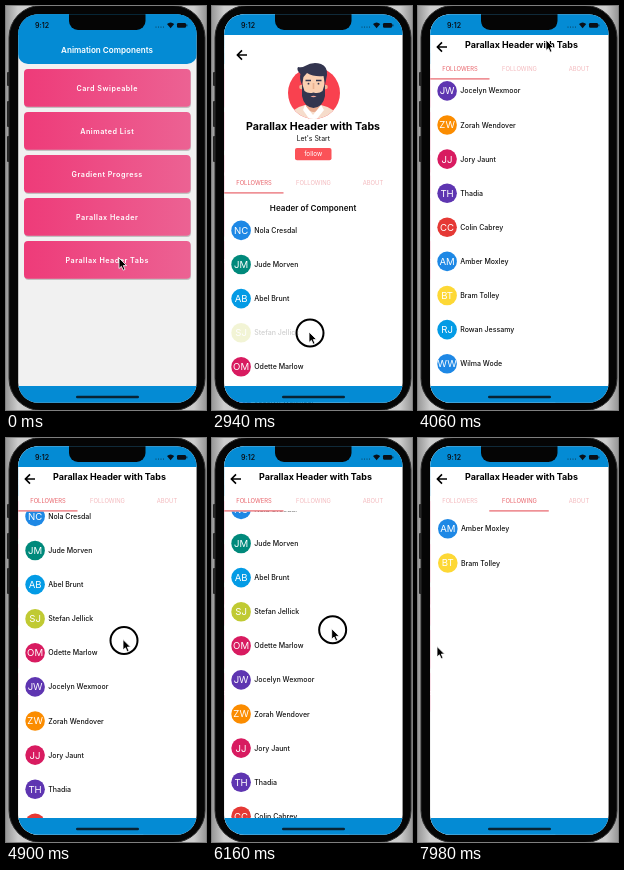
An HTML page that plays this animation: 200x404 px, repeating every 8 s.

```html
<!DOCTYPE html>
<html lang="en">
<head>
<meta charset="utf-8">
<title>Parallax header demo</title>
<style>
html, body { margin: 0; width: 100%; height: 100%; overflow: hidden; background: #c6c6c6; }
svg { display: block; width: 100vw; height: 100vh; }
text { font-family: Inter, Roboto, "Liberation Sans", sans-serif; }
</style>
</head>
<body>
<svg id="stage" viewBox="0 0 200 404"></svg>
<script>
const BLUE = '#048bd4', RED = '#e8636a', PALE = '#f3b9bd';
const PAGE = 179, PITCH = 34.1;

const label = (x, y, size, weight, fill, text, anchor = 'middle', extra = '') =>
  `<text x="${x}" y="${y + size * .36}" font-size="${size}" font-weight="${weight}" fill="${fill}" text-anchor="${anchor}" ${extra}>${text}</text>`;
const box = (x, y, w, h, fill, r = 0, extra = '') =>
  `<rect x="${x}" y="${y}" width="${w}" height="${h}" rx="${r}" fill="${fill}" ${extra}/>`;

const people = [
  ['NC', 'Nola Cresdal', '#1e88e5'], ['JM', 'Jude Morven', '#00897b'],
  ['AB', 'Abel Brunt', '#039be5'], ['SJ', 'Stefan Jellick', '#c0ca33'],
  ['OM', 'Odette Marlow', '#d81b60'], ['JW', 'Jocelyn Wexmoor', '#5e35b1'],
  ['ZW', 'Zorah Wendover', '#fb8c00'], ['JJ', 'Jory Jaunt', '#d81b60'],
  ['TH', 'Thadia', '#5e35b1'], ['CC', 'Colin Cabrey', '#e53935'],
  ['AM', 'Amber Moxley', '#1e88e5'], ['BT', 'Bram Tolley', '#fdd835'],
  ['RJ', 'Rowan Jessamy', '#039be5'], ['WW', 'Wilma Wode', '#1e88e5']
];
const row = ([initials, name, color], y, id = '') =>
  `<g ${id && `id="${id}"`}><circle cx="29.1" cy="${y}" r="9.8" fill="${color}"/>` +
  label(29.1, y, 9.6, 400, '#fff', initials) +
  label(42.2, y, 7, 500, '#111', name, 'start') + '</g>';

const menu = ['Card Swipeable', 'Animated List', 'Gradient Progress', 'Parallax Header', 'Parallax Header Tabs']
  .map((name, i) => {
    const y = 63 + 43 * i;
    return `<g id="menu${i}">` + box(18.5, y + 1, 166.5, 38, '#0003', 4) + box(18, y, 166.5, 37.7, 'url(#pink)', 4) +
      label(101.2, y + 19.3, 7.2, 600, '#fff', name, 'middle', 'letter-spacing=".5"') + '</g>';
  }).join('');

const portrait = `
  <circle cx="102" cy="87" r="26" fill="#f9414f"/>
  <g clip-path="url(#disc)">
    <path d="M76 114Q79 102 93 99H109Q124 102 127 114Z" fill="#f6dccb"/>
    <path d="M94 92H109V102Q102 110 94 102Z" fill="#e8a98c"/>
    <path d="M93 99L101 109L109 99L112 104L104 114H98L91 104Z" fill="#fff"/>
  </g>
  <circle cx="89.500" cy="81" r="2.300" fill="#f2b798"/><circle cx="113.500" cy="81" r="2.300" fill="#f2b798"/>
  <path d="M90.500 66H112.500V88Q111 97 101.500 97Q92 97 90.500 88Z" fill="#fbcfb1"/>
  <path d="M90 77L92.500 85Q96 88 101.500 86.500Q107 88 110.500 85L113 77V90Q111 101 101.500 102Q92 101 90 90Z" fill="#33354f"/>
  <path d="M98.500 90.300Q101.500 89.300 104.500 90.300Q101.500 92 98.500 90.300Z" fill="#f2a79a"/>
  <path d="M90 79Q87 72 88.500 68Q84 64 86 61Q90 62 93 60Q101 55 109 58Q116 61 115 69L113 79L111.500 70Q102 71 95 67L91.500 71Z" fill="#33354f"/>
  <path d="M93.500 74.500H99M104 74.500H109.500" stroke="#33354f" stroke-width="1.3"/>
  <circle cx="96.500" cy="77.700" r=".9" fill="#33354f"/><circle cx="106.500" cy="77.700" r=".9" fill="#33354f"/>
  <path d="M101.500 77V83" stroke="#eab08f" stroke-width="1.600"/>`;

const tabs = ['FOLLOWERS', 'FOLLOWING', 'ABOUT'];

document.getElementById('stage').innerHTML = `
<defs>
  <linearGradient id="pink"><stop stop-color="#ee3b79"/><stop offset="1" stop-color="#ec6293"/></linearGradient>
  <linearGradient id="edge"><stop stop-color="#989898"/><stop offset=".06" stop-color="#cdcdcd"/>
    <stop offset=".94" stop-color="#cdcdcd"/><stop offset="1" stop-color="#989898"/></linearGradient>
  <clipPath id="screen">${box(12.2, 8.2, 178.4, 388.6, '#000', 20)}</clipPath>
  <clipPath id="disc"><circle cx="102" cy="87" r="26"/></clipPath>
  <clipPath id="listClip"><rect id="listBox" x="12" width="179" height="400"/></clipPath>
</defs>
${box(0, 0, 200, 404, 'url(#edge)')}
${box(1, 66, 4, 14, '#222', 1)}${box(1, 95, 4, 26, '#222', 1)}${box(1, 130, 4, 26, '#222', 1)}
${box(3, -.5, 196, 405, '#050505', 32, 'stroke="#2c2c2c" stroke-width="1"')}
<g clip-path="url(#screen)">
  <g id="menu">
    ${box(12, 8, 179, 389, '#f1f1f1')}
    ${box(12, 0, 179, 58, BLUE, 10)}
    ${label(101, 44, 8.1, 600, '#fff', 'Animation Components')}
    ${menu}
  </g>
  <g id="profile">
    ${box(12, 8, 179, 389, '#fff')}
    <g clip-path="url(#listClip)">
      <g id="followers">
        ${label(101.1, 202.5, 8.1, 600, '#111', 'Header of Component')}
        ${people.map((p, i) => row(p, 224.4 + PITCH * i, 'row' + i)).join('')}
      </g>
      <g id="following">${row(people[10], 90.7)}${row(people[11], 125)}</g>
    </g>
    <g id="hero">
      ${portrait}
      ${label(101.3, 133, 6.9, 400, '#111', "Let's Start")}
      ${box(83, 142, 36.5, 12.2, '#fb5258', 2)}
      ${label(101.2, 148, 6.4, 400, '#fff', 'follow')}
    </g>
    <g id="title">${label(0, 0, 10.6, 650, '#000', 'Parallax Header with Tabs')}</g>
    <path id="back" d="M5 0H-4.500M0-4.600L-4.600 0L0 4.600" fill="none" stroke="#000" stroke-width="1.600"/>
    <g id="tabs">
      ${tabs.map((t, i) => label(42 + 59.5 * i, -10.5, 5.85, 400, PALE, t, 'middle', `id="tab${i}"`)).join('')}
      <rect id="line" y="-.7" width="59.500" height="1.200" fill="${RED}"/>
    </g>
  </g>
  ${box(12, 8, 179, 21, BLUE)}
  ${box(12, 380, 179, 18, BLUE)}
  ${box(63, 0, 76.5, 24, '#050505', 9)}
  ${label(36, 19.3, 7, 600, '#0a1018', '9:12')}
  <g fill="#0a1018">
    ${[150, 152.5, 155, 157.5].map(x => `<circle cx="${x}" cy="21" r=".6" opacity=".7"/>`).join('')}
    <path d="M161 18Q164.600 15 168.200 18L164.600 22.300Z"/>
    ${box(171, 17, 9, 4.8, '#0a1018', 1.2)}${box(180.4, 18.5, .9, 1.8, '#0a1018')}
  </g>
  ${box(70, 389.8, 63, 2.4, '#082334', 1.2)}
</g>
<g id="cursor">
  <circle id="ring" cx="1" cy="1" r="13.500" fill="#fff6" stroke="#000" stroke-width="2"/>
  <path d="M0 0V10.500L2.400 8.300L4.200 12.200L6 11.400L4.300 7.600H7.600Z" fill="#000" stroke="#fff" stroke-width=".8"/>
</g>`;

// Keys: [time, value, ...]
const cursorKeys = [
  [0, 113, 252], [560, 113, 252], [840, 113, 257], [1260, 113, 258], [2240, 97, 326], [3080, 97, 326],
  [3920, 128, 34], [4060, 128, 34], [4340, 126, 60], [4480, 126, 60], [5320, 108, 343], [5740, 108, 343],
  [6440, 126, 108], [6720, 126, 108], [7140, 165, 208], [7280, 165, 208], [7700, 24, 209], [7980, 19, 208.5]
];
const scrollKeys = [
  [560, -8], [840, -4], [1120, 0], [3080, 0], [3920, 314], [4060, 310], [4340, 306], [4480, 306],
  [5320, -14], [5460, -8], [5740, 0], [6580, 306]
];
const pushKeys = [[280, PAGE], [700, 0]];
const swipeKeys = [[7280, 0], [7700, 141], [7980, 178.3], [8000, PAGE]];
const presses = [[140, 280], [2800, 3780], [4480, 5180], [5740, 6300], [7140, 7700]];

function sample(keys, t, k = 1) {
  const i = keys.findIndex(key => key[0] > t);
  if (i < 0) return keys[keys.length - 1][k];
  if (i === 0) return keys[0][k];
  const a = keys[i - 1], b = keys[i], u = (t - a[0]) / (b[0] - a[0]);
  return a[k] + (b[k] - a[k]) * u * u * (3 - 2 * u);
}
const within = (t, from, to) => t >= from && t < to;
const set = (id, name, value) => document.getElementById(id).setAttribute(name, value);
const move = (id, x, y, scale = 1) => set(id, 'transform', `translate(${x} ${y}) scale(${scale})`);

function draw(t) {
  const scroll = sample(scrollKeys, t), push = sample(pushKeys, t), swipe = sample(swipeKeys, t);
  const fold = Math.max(0, Math.min(1, scroll / 81));
  const tabY = Math.max(73, 187 - scroll);

  move('menu', (push - PAGE) * .3, 0);
  move('profile', push, 0);
  set('menu4', 'opacity', within(t, 140, 420) ? .4 : 1);
  set('row3', 'opacity', within(t, 2800, 3080) ? .2 : 1);

  move('hero', 0, -scroll);
  set('hero', 'opacity', 1 - fold);
  move('title', 101 + 2.5 * fold, Math.max(39, 120 - scroll), 1 - .157 * fold);
  move('back', 30 - 6 * fold, Math.max(41, 49 - scroll));

  move('tabs', 0, tabY);
  set('line', 'x', 12 + 59.5 * swipe / PAGE);
  tabs.forEach((_, i) => set('tab' + i, 'fill', i === Math.round(swipe / PAGE) ? RED : PALE));
  set('listBox', 'y', tabY + .6);
  move('followers', -swipe, -scroll);
  move('following', PAGE - swipe, 0);

  move('cursor', sample(cursorKeys, t), sample(cursorKeys, t, 2));
  set('ring', 'opacity', presses.some(([from, to]) => within(t, from, to)) ? 1 : 0);
}

function tick() {
  const t = performance.now() % 8000;
  draw(Math.floor(t / 140) * 140);
  requestAnimationFrame(tick);
}
tick();
</script>
</body>
</html>
```
